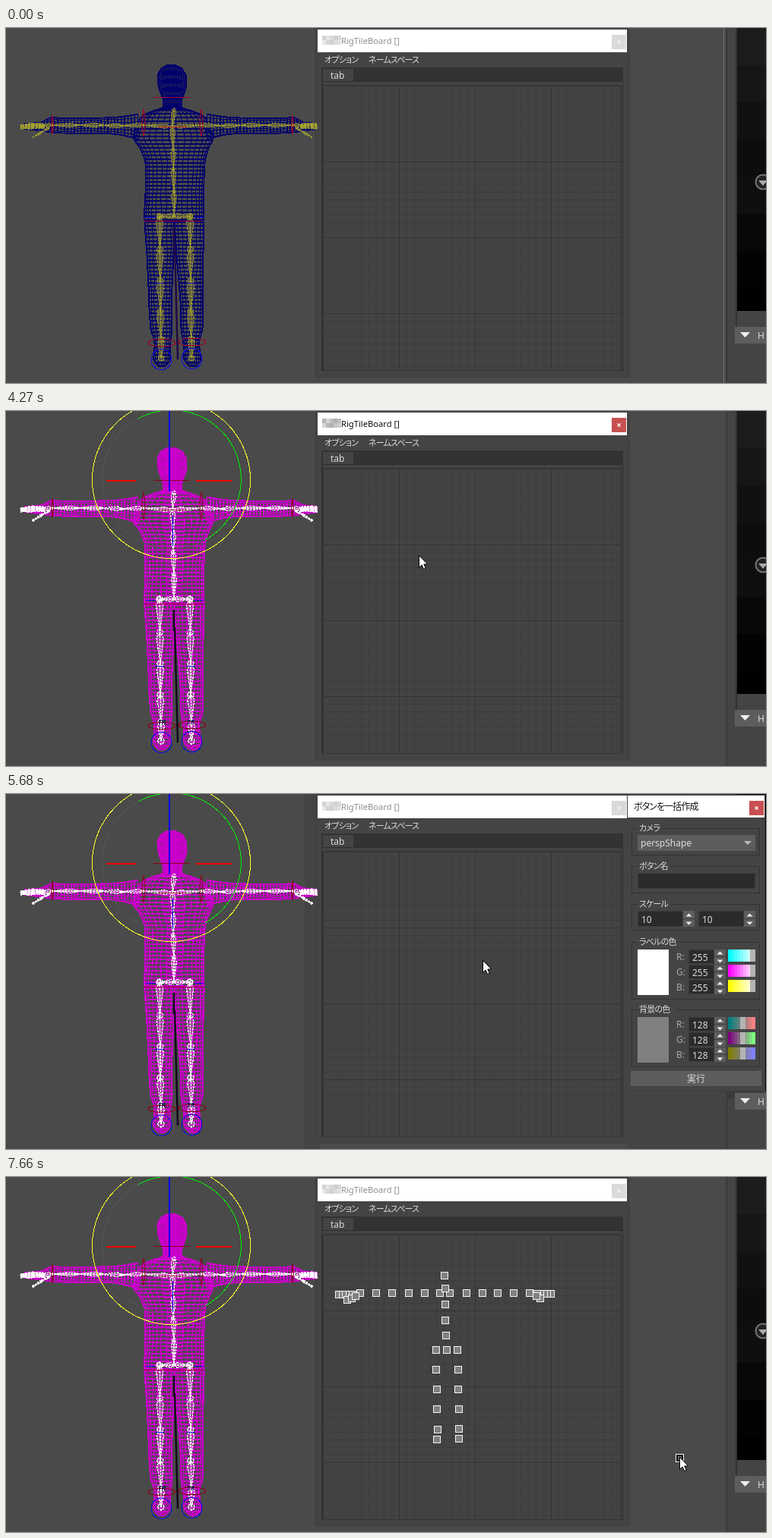
Write an HTML page that moves like this. It is 1000 px wide and 468 px high and loops after 8000 ms.

```html
<!DOCTYPE html>
<html lang="ja">
<head>
<meta charset="utf-8">
<title>Rig picker</title>
<style>
html, body { margin: 0; width: 100%; height: 100%; overflow: hidden; background: #4a4a4a; }
svg { display: block; width: 100vw; height: 100vh; }
text { font: 12px "Noto Sans", "Noto Sans CJK JP", sans-serif; fill: #dcdcdc; white-space: pre; }
.jp { font-feature-settings: "palt"; letter-spacing: -.9px; }
.small { font-size: 11px; letter-spacing: -.8px; }
.title { font-size: 11.2px; fill: #8f8f8f; }
rect, .crisp { shape-rendering: crispEdges; }
.line { fill: none; }

.anim { animation: 8s step-end infinite; }
.edge { animation-name: edge; }
.mesh { fill: none; stroke: #00006a; animation-name: mesh; }
.skin { fill: #00006a; fill-opacity: .4; animation-name: skin; }
.bone { fill: #a09c2c; fill-opacity: .45; stroke: #a8a430; stroke-width: .9; animation-name: bone; }
.ctrl { fill: none; stroke: #a0002c; animation-name: ctrl; }
.pole { fill: none; stroke: #200a48; stroke-width: 2.5; animation-name: pole; }
.picked { animation-name: picked; }
.active { animation-name: active; }
.menu { animation-name: menu; }
.hot { animation-name: hot; }
.hot2 { animation-name: hot2; }
.dialog { animation-name: dialog; }
.run { fill: #5d5d5d; animation-name: run; }
.made { animation-name: made; }
.busy { animation-name: busy; }
.cursor { animation-name: cursor; }

@keyframes edge { 0% { opacity: 1 } 5.375%, 100% { opacity: 0 } }
@keyframes mesh { 37.25%, 100% { stroke: #c800c8; stroke-width: 1.3 } }
@keyframes skin { 37.25%, 100% { fill: #c800c8; fill-opacity: .6 } }
@keyframes bone { 37.25%, 100% { fill: #fff; fill-opacity: .2; stroke: #fff; stroke-width: 1.2 } }
@keyframes ctrl { 37.25%, 100% { stroke: #8c0018 } }
@keyframes pole { 37.25%, 100% { stroke: #12081c } }
@keyframes picked { 0% { opacity: 0 } 37.25%, 100% { opacity: 1 } }
@keyframes active { 0% { opacity: 0 } 53.375% { opacity: 1 } 71%, 100% { opacity: 0 } }
@keyframes menu { 0% { opacity: 0 } 55.25% { opacity: 1 } 71%, 100% { opacity: 0 } }
@keyframes hot { 0% { opacity: 0 } 57.125% { opacity: 1 } 60.25%, 100% { opacity: 0 } }
@keyframes hot2 { 0% { opacity: 0 } 60.25% { opacity: 1 } 71%, 100% { opacity: 0 } }
@keyframes dialog { 0% { opacity: 0 } 71% { opacity: 1 } 94.25% { opacity: .5 } 95.75%, 100% { opacity: 0 } }
@keyframes run { 79.75% { fill: #707070 } 89.375% { fill: #1e1e1e } 91.125%, 100% { fill: #707070 } }
@keyframes made { 0% { opacity: 0 } 94.25%, 100% { opacity: 1 } }
@keyframes busy { 0% { opacity: 0 } 95.75%, 100% { opacity: 1 } }
@keyframes cursor {
  0% { transform: translate(-40px, 0) }
  41% { transform: translate(687px, 277px) }
  42.875% { transform: translate(694px, 261px) }
  46.625% { transform: translate(610px, 205px) }
  48.125% { transform: translate(543px, 174px) }
  50% { transform: translate(542px, 192px) }
  51.875% { transform: translate(543px, 191px) }
  53.375% { transform: translate(543px, 190px) }
  57.125% { transform: translate(567px, 196px) }
  58.75% { transform: translate(600px, 207px) }
  60.25% { transform: translate(627px, 217px) }
  62.125% { transform: translate(627px, 219px) }
  76.625% { transform: translate(700px, 265px) }
  78.25% { transform: translate(800px, 325px) }
  79.75% { transform: translate(866px, 366px) }
  81.625% { transform: translate(887px, 371px) }
  95.75%, 100% { transform: translate(886px, 369px) }
}
</style>
</head>
<body>
<svg id="stage" viewBox="0 0 1000 468" preserveAspectRatio="none"></svg>
<script>
const rect = (x, y, w, h, fill, more = '') =>
  `<rect x="${x}" y="${y}" width="${w}" height="${h}" fill="${fill}" ${more}/>`;
const box = (x, y, w, h, fill, stroke) =>
  rect(x + .5, y + .5, w - 1, h - 1, fill, `stroke="${stroke}"`);
const path = (d, cls, more = '') => `<path d="${d}" class="${cls}" ${more}/>`;
const line = (d, stroke, w = 1) => path(d, 'line crisp', `stroke="${stroke}" stroke-width="${w}"`);
const text = (x, y, s, cls = '', more = '') => `<text x="${x}" y="${y}" class="${cls}" ${more}>${s}</text>`;
const group = (cls, ...kids) => `<g class="${cls}">${kids.join('')}</g>`;
const range = (n, f) => Array.from({ length: n }, (_, i) => f(i));

// Body parts are cross-sections: [position, near edge, far edge].
function edges(part, t) {
  let i = 1;
  while (i < part.length - 1 && part[i][0] < t) i++;
  const [p, q] = [part[i - 1], part[i]];
  const k = (t - p[0]) / (q[0] - p[0]);
  return [p[1] + (q[1] - p[1]) * k, p[2] + (q[2] - p[2]) * k];
}

function wire(part, cols, step, bow, flat) {
  const pt = (t, s) => (flat ? [t, s] : [s, t]).map(v => v.toFixed(1)).join(' ');
  const end = part[part.length - 1][0];
  const stops = [];
  for (let t = part[0][0]; t <= end; t += step) stops.push(t);
  let d = '';
  for (const t of stops) {
    const [a, b] = edges(part, t);
    for (const sag of [bow, -bow * .6])
      d += `M${pt(t, a)}Q${pt(t + sag, (a + b) / 2)} ${pt(t, b)}`;
  }
  for (let j = 0; j <= cols; j++) {
    const u = (1 - Math.cos(Math.PI * j / cols)) / 2;
    d += 'M' + stops.map(t => {
      const [a, b] = edges(part, t);
      return pt(t, a + (b - a) * u + Math.sin(t * .11 + j) * .7 * Math.sin(Math.PI * u));
    }).join('L');
  }
  return path(d, 'mesh anim crisp');
}

function skin(part) {
  const d = [...part.map(p => `${p[1]} ${p[0]}`), ...part.map(p => `${p[2]} ${p[0]}`).reverse()];
  return path(`M${d.join('L')}Z`, 'skin anim');
}

function bones(points, w, joint = w * .7) {
  let d = '';
  points.forEach(([x, y], i) => {
    d += `M${x - joint} ${y}a${joint} ${joint} 0 1 0 ${joint * 2} 0a${joint} ${joint} 0 1 0 ${-joint * 2} 0`;
    if (!i) return;
    const [px, py] = points[i - 1];
    const dx = x - px, dy = y - py, n = Math.hypot(dx, dy);
    const mx = px + dx * .18, my = py + dy * .18, ox = -dy / n * w, oy = dx / n * w;
    d += `M${px} ${py}L${mx + ox} ${my + oy}L${x} ${y}L${mx - ox} ${my - oy}ZL${x} ${y}`;
  });
  return path(d, 'bone anim crisp', 'stroke-dasharray="3 1"');
}

const head = [[49, 211, 224], [53, 204, 232], [62, 199, 237], [76, 200, 238], [86, 203, 235],
  [93, 206, 232], [104, 207, 231], [110, 194, 244]];
const torso = [[108, 196, 242], [115, 178, 261], [128, 172, 267], [145, 166, 274], [158, 176, 267],
  [175, 183, 262], [220, 183, 260], [256, 181, 261]];
const arm = [[24, 126, 133], [46, 124, 136], [60, 117, 138], [75, 119, 139], [130, 118, 139],
  [150, 117, 141], [174, 113, 147]];
const legL = [[256, 182, 222], [300, 185, 221], [340, 187, 219], [370, 188, 218], [398, 190, 219],
  [412, 195, 217], [425, 195, 216], [438, 193, 217], [446, 200, 210]];
const legR = legL.map(([t, a, b]) => {
  const sum = 443 + (t - 256) * .042;
  return [t, sum - b, sum - a];
});

const side = wire(arm, 8, 4.4, 1.6, true) +
  bones([[217, 130], [180, 128], [152, 129], [125, 128], [92, 128], [60, 128], [45, 129]], 2.8) +
  range(4, i => bones([[50, 127 + i * 1.4], [36, 126 + i * 2], [20, 128 + i * 1.4]], 1.4)).join('') +
  bones([[56, 132], [47, 137], [36, 144]], 1.6) +
  path('M61 115Q58 128 61 140Q64 128 61 115M181 107Q177 125 181 143Q185 125 181 107', 'ctrl anim');

const leg = x => bones([[x, 248], [x + .5, 292], [x + 1, 333], [x + 1, 374], [x + 2, 410], [x + 2, 435]], 4.6, 4);

const figure =
  wire(torso, 17, 5, 2) +
  wire(legL, 9, 5, 1.8) + wire(legR, 9, 5, 1.8) +
  side + `<g transform="translate(438) scale(-1 1)">${side}</g>` +
  wire(head, 15, 2.2, 1.2) + skin(head) +
  path('M222 285L226 437M221 262V290', 'pole anim') +
  bones([[221, 108], [219, 130], [220, 160], [220, 186], [221, 215], [221, 248], [202, 248]], 3.4) +
  bones([[221, 248], [243, 248]], 3.4) + leg(202) + leg(242) +
  path('M194 91.5H242M182 254.5H258M200 130.5H238M187 415a18 5 0 1 0 36 0a18 5 0 1 0 -36 0' +
    'M227 414a18 5 0 1 0 36 0a18 5 0 1 0 -36 0', 'ctrl anim crisp') +
  line('M191 437a13.5 13.5 0 1 0 27 0a13.5 13.5 0 1 0 -27 0M231 436a13.5 13.5 0 1 0 27 0a13.5 13.5 0 1 0 -27 0' +
    'M196 336.5H208M238 336.5H249M184 249.5H196M248 249.5H260', '#0a0ae6');

const manip = group('picked anim',
  line('M174 10A91 91 0 0 0 262 170', '#555'),
  line('M174 10A91 91 0 0 1 262 170', '#00f000'),
  '<circle class="crisp" cx="217.5" cy="90.5" r="104" fill="none" stroke="#ffff28"/>',
  line('M132 92H171M250 92H297', '#f00000', 2),
  line('M215 0V106', '#0000f0', 2), line('M219.5 138V178', '#0000f0'),
  ['200', '238'].map(x => text(x, 413, 'TR', '', 'style="font:italic bold 9px Noto Sans,sans-serif;fill:#10104c"')).join(''));

const shade = [28, 22, 17, 13, 15, 8, 3, 1];
const backdrop =
  rect(0, 0, 1000, 468, '#4a4a4a') +
  rect(948, 0, 52, 468, '#444') + rect(945, 0, 3, 468, '#474747') + rect(948, 0, 1, 468, '#333') +
  rect(944, 0, 1, 468, '#777', 'class="edge anim"') +
  rect(960, 0, 2, 394, '#333') +
  shade.map((v, i) => rect(962, i * 49, 38, Math.min(49, 373 - i * 49), `rgb(${v},${v},${v})`)).join('') +
  '<circle cx="996" cy="203" r="9.5" fill="#222" stroke="#777" stroke-width="2"/>' +
  path('M990 201H1002L996 208Z', '', 'fill="#aaa"') +
  rect(959, 394, 41, 22, '#5d5d5d') + path('M966 401H979L972.5 408Z', '', 'fill="#eee"') +
  text(989, 410, 'H') +
  group('dialog anim', rect(393, 0, 20, 468, '#444')) +
  rect(406, 0, 415, 461, '#424242', 'rx="4"');

const cross = (x, y, c) => path(`M${x - 2} ${y - 2}l4 4m0 -4l-4 4`, 'line', `stroke="${c}" stroke-width="1.2"`);
const mosaic = o => range(10, i =>
  rect(416 + i % 5 * 5, 10 + (i / 5 | 0) * 6, 5, 6, `rgba(90,90,90,${o * (.45 + .5 * Math.abs(Math.sin(i * 2.3 + 1)))})`)).join('');
const title = 'RigTileBoard []';

const picker =
  rect(410, 2, 407, 30, '#fff') + rect(410, 32, 407, 425, '#444') +
  mosaic(.3) + text(441, 21, title, 'title') +
  rect(797, 9, 19, 19, '#dadada') + cross(806.5, 18.5, '#f2f2f2') +
  group('active anim', rect(410, 2, 407, 30, '#fff'), mosaic(.5),
    text(441, 21, title, 'title', 'style="fill:#111"'),
    rect(797, 9, 19, 19, '#c75050'), cross(806.5, 18.5, '#fff')) +
  text(419, 46, 'オプション', 'jp small') + text(477, 46, 'ネームスペース', 'jp small') +
  rect(415, 52, 397, 19, '#333') + rect(417, 54, 40, 17, '#444') + text(427, 67, 'tab') +
  box(415, 70, 397, 382, '#434343', '#2e2e2e') +
  rect(417, 76, 393, 375, 'url(#minor)') + rect(417, 76, 393, 375, 'url(#major)') +
  box(416, 75, 394, 377, 'none', '#353535');

const armX = [466, 487, 508, 530, 551, 571, 584, 606, 627, 647, 668, 689];
const spots = [
  ...armX.map(x => [x, 153]),
  ...range(5, i => [438 + i * 4.6, 155]), [449, 162], [455, 160], [460, 157],
  ...range(5, i => [717 - i * 4.6, 154]), [703, 160], [698, 157],
  [577, 130], [578, 147], [578, 168], [578, 189], [579, 209], [580, 228],
  ...range(4, i => [565.5 + i * .6, 228 + i * 26]), ...range(4, i => [594 + i * .6, 228 + i * 26]),
  [568, 333], [567, 346], [596, 332], [596, 345]
];
const made = group('made anim',
  ...spots.map(([x, y]) => box(Math.round(x) - 5, Math.round(y) - 5, 10, 10, '#808080', '#f4f4f4')));

const item = (y, s, more) => text(569, y, s, 'jp', more || 'style="fill:#eee"');
const menu = group('menu anim',
  rect(549, 196, 157, 148, '#2c2c2c', 'opacity=".8"'),
  box(543, 190, 161, 153, '#444', '#333'), rect(563, 191, 140, 151, '#525252'),
  rect(563, 191, 140, 20, '#5285a6', 'class="hot anim"'),
  rect(563, 211, 140, 20, '#5285a6', 'class="hot2 anim"'),
  rect(564, 273, 139, 1, '#757575'), rect(564, 318, 139, 1, '#757575'),
  item(206, 'ボタンを作成'), item(226, 'ボタンを一括作成'), item(246, 'ボタンを一括編集'),
  item(266, 'ボタンを一括削除'), item(291, 'ボタンをコピー'),
  item(311, 'ボタンをペースト', 'style="fill:#7c7c7c"'), item(336, 'デバッグ'));

function field(x, y, w, h, s = '') {
  return box(x, y, w, h, '#2b2b2b', '#3a3a3a') + text(x + 5, y + h / 2 + 5, s);
}
function spin(x, y, w, h, s) {
  const bx = x + w - 15, m = y + h / 2;
  return field(x, y, w - 15, h, s) + rect(bx, y, 15, h, '#5d5d5d') + rect(bx, Math.floor(m), 15, 1, '#3a3a3a') +
    path(`M${bx + 3.5} ${m - 3}h8l-4 -4zM${bx + 3.5} ${m + 4}h8l-4 4z`, '', 'fill="#eee"');
}
function frame(y, h, label, cut) {
  return box(823, y, 169, h, 'none', '#333') + rect(830, y - 1, cut, 3, '#444') + text(833, y + 4, label, 'jp small');
}
function channels(y, value, swatch) {
  return rect(831, y, 41, 60, swatch) + ['R', 'G', 'B'].map((name, c) => {
    const top = y + c * 20, at = value / 255;
    const bands = range(9, i => {
      const rgb = [0, 1, 2].map(k => Math.round(k === c ? 255 * i / 8 : value));
      return rect(950 + i * 4, top, 4, 16, `rgb(${rgb})`);
    }).join('');
    return text(882, top + 14, name + ':', '', 'style="fill:#aaa"') + spin(898, top, 49, 19, value) +
      bands + rect(950 + Math.round(at * 29 + (value < 255 ? 1 : 0)), top, 7, 16, '#b4b4b4');
  }).join('');
}

const dialog = group('dialog anim',
  rect(820, 391, 128, 77, '#444'),
  rect(818, 1, 182, 400, '#3c3c3c'), rect(999, 0, 1, 391, '#0a0a0a'),
  rect(818, 392, 130, 76, '#444'), rect(948, 392, 11, 10, '#3a3a3a'),
  rect(959, 394, 41, 22, '#5d5d5d'), path('M966 401H979L972.5 408Z', '', 'fill="#eee"'), text(989, 410, 'H'),
  rect(818, 2, 180, 29, '#fff'), rect(818, 31, 180, 360, '#444'),
  text(826, 21, 'ボタンを一括作成', 'jp', 'style="fill:#111"'),
  rect(978, 9, 19, 19, '#c75050'), cross(987.5, 18.5, '#fff'),
  frame(45, 36, 'カメラ', 32), rect(831, 54, 155, 21, '#5d5d5d'), text(835, 69, 'perspShape'),
  path('M971 62H981L976 67Z', '', 'fill="#bbb"'),
  frame(95, 36, 'ボタン名', 45), field(831, 104, 155, 21),
  frame(145, 35, 'スケール', 44), spin(831, 154, 75, 21, 10), spin(911, 154, 75, 21, 10),
  frame(195, 76, 'ラベルの色', 52), channels(205, 255, '#fff'),
  frame(284, 76, '背景の色', 52), channels(294, 128, '#808080'),
  rect(822, 365, 172, 20, '#5d5d5d', 'class="run anim"'), text(896, 380, '実行'));

const cursor = group('cursor anim',
  group('busy anim', box(-5, -4, 11, 11, '#000', '#fff'), box(-3, -2, 7, 7, '#666', '#000')),
  path('M.5 .5V16.5L4 13L6.6 18.6L9.2 17.4L6.8 12H11.6Z', '', 'fill="#fff" stroke="#000"'));

const pattern = (id, x, y, n, c) =>
  `<pattern id="${id}" x="${x}" y="${y}" width="${n}" height="${n}" patternUnits="userSpaceOnUse">` +
  rect(0, 0, n, 1, c) + rect(0, 0, 1, n, c) + '</pattern>';
const defs = '<defs>' + pattern('minor', 417, 76, 10, '#3d3d3d') + pattern('major', 417, 76, 100, '#343434') + '</defs>';

document.getElementById('stage').innerHTML =
  defs + backdrop + figure + manip + picker + made + menu + dialog + cursor;
</script>
</body>
</html>
```
